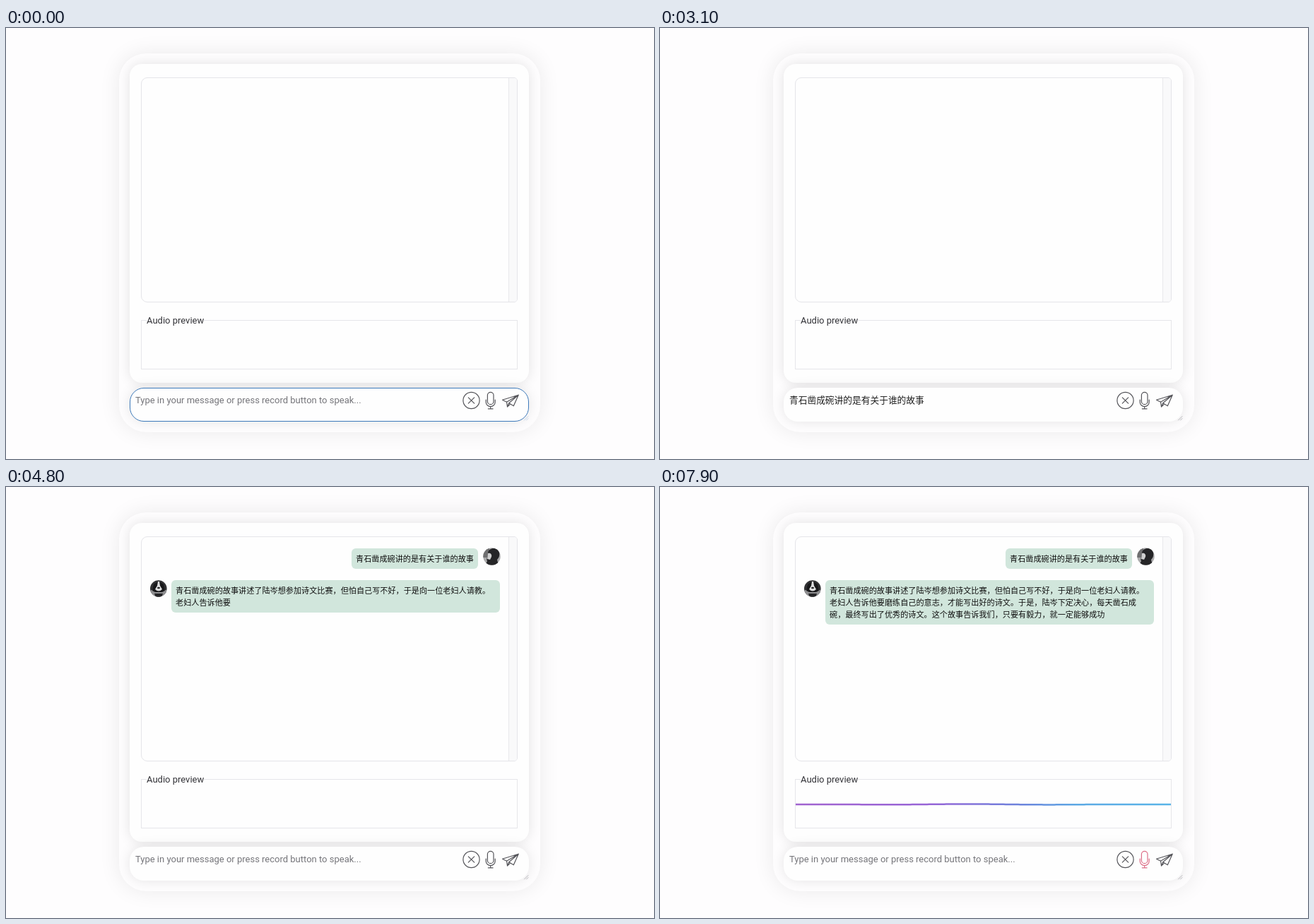
Recreate the animation shown at these times as an HTML page with a canvas. Size 917 by 611 pixels, loop 8000 ms.

```html
<!DOCTYPE html>
<html lang="zh-CN">
<head>
<meta charset="utf-8">
<title>Chat</title>
<style>
html, body { margin: 0; width: 100%; height: 100%; overflow: hidden; background: #fefdfe; }
body { position: relative; font: 13px/20px Roboto, "Noto Sans CJK SC", sans-serif; color: #333338; }
body > * { position: absolute; box-sizing: border-box; }
#outer { left: 160px; top: 36px; width: 596px; height: 537px; border-radius: 38px;
  background: #fefdfe; box-shadow: 0 0 30px rgba(0,0,0,.08); }
#card { left: 175px; top: 51px; width: 565px; height: 452px; border-radius: 17px;
  background: #fefefe; box-shadow: 0 0 18px rgba(0,0,0,.11); }
#log { left: 191px; top: 70px; width: 533px; height: 319px; border: 1.3px solid #e5e5e9;
  border-radius: 9px 5px 5px 9px; overflow: hidden; }
#log i { position: absolute; right: 0; top: 0; width: 12px; height: 100%;
  box-sizing: border-box; background: #f9f9fa; border-left: 1px solid #e8e8eb; }
#preview { left: 191px; top: 414px; width: 533px; height: 70px; border: 1px solid #e6e6ea; }
#legend { left: 199px; top: 404.5px; background: #fefefe; white-space: nowrap; }
#input { left: 175px; top: 509.5px; width: 565px; height: 48px; border-radius: 20px;
  background: #fefefe; box-shadow: 0 0 18px rgba(0,0,0,.1); }
#input.focus { border: 1.7px solid #3d7abb; }
#text { left: 183px; top: 517.5px; white-space: pre; font-size: 12.73px; color: #222; }
#text.hint { font-size: 13px; color: #75757a; }
#text u { text-decoration-thickness: 1px; text-underline-offset: 2px; }
#caret { display: inline-block; width: 1px; height: 16px; vertical-align: -3px; background: #333; }
.bubble { padding: 6px; border-radius: 6px; background: #d1e6dc; color: #111;
  font: 500 11.13px/17px "Noto Sans CJK SC", "Noto Sans CJK", sans-serif;
  width: max-content; max-width: 465px; text-spacing-trim: space-all; }
#ask { right: auto; left: 489px; top: 87px; }
#reply { left: 234px; top: 132px; }
svg, canvas { left: 0; top: 0; width: 917px; height: 611px; }
</style>
</head>
<body>
<div id="outer"></div>
<div id="card"></div>
<div id="log"><i></i></div>
<div id="preview"></div>
<div id="legend">Audio preview</div>
<div id="input"></div>
<div id="text"></div>
<div id="ask" class="bubble"></div>
<div id="reply" class="bubble"></div>
<canvas id="wave" width="917" height="611"></canvas>
<svg viewBox="0 0 917 611" fill="none" stroke="#55555a" stroke-width="1.2" stroke-linecap="round" stroke-linejoin="round">
  <clipPath id="clipA"><circle cx="687.5" cy="98.5" r="12.2"/></clipPath>
  <clipPath id="clipB"><circle cx="215.8" cy="144" r="11.8"/></clipPath>
  <g id="userPic" stroke="none" clip-path="url(#clipA)">
    <path fill="#a9a9aa" d="M675 86h25v25h-25z"/>
    <path fill="#6f6f70" d="M675 86h9v14h-9z"/>
    <path fill="#252527" d="M682 94c0-8 14-10 16-1 1 5-1 8-3 10l2 8h-19l3-6c-2-3 1-5 1-11z"/>
    <path fill="#d0d0d0" d="M682 94c3-1 6 1 5 5l-2 4-4-1z"/>
  </g>
  <g id="botPic" stroke="none" clip-path="url(#clipB)">
    <path fill="#313133" d="M203 132h26v25h-26z"/>
    <path fill="#8f8f91" d="M203 147l7-2 6 4 6-4 7 2v10h-26z"/>
    <path fill="#18181a" d="M209 138q7-7 14 0l2 9-4 2h-10l-4-2z"/>
    <path fill="#dededf" d="M215 134h2l1 6 3 5q-5 5-10 0l3-5z"/>
    <ellipse cx="216" cy="143" rx="2" ry="1.3" fill="#252527"/>
    <path fill="#252527" d="M210 151h12l-2 6h-8z"/>
  </g>
  <circle cx="658.5" cy="528" r="11.6"/>
  <path d="M654.3 523.8l8.4 8.4M662.7 523.8l-8.4 8.4"/>
  <g id="mic">
    <rect x="681.4" y="516.3" width="8.6" height="17.4" rx="4.3"/>
    <path d="M679.2 527v3.2a6.5 6.5 0 0 0 13 0V527M685.7 536.7v3M682.3 539.8h6.8"/>
  </g>
  <path d="M702.5 527.3L725.2 520.2 718.3 535.8 711.7 531.7 725.2 520.2 708.5 530.2zM708.5 530.2L709.5 537 711.7 531.7M709.5 537L713.6 533"/>
  <path id="grip" stroke="#a5a5aa" stroke-width=".8" d="M733.5 556l5.5-5.5M736.5 556l2.5-2.5"/>
</svg>
<script>
const LOOP = 8000, SEND = 3200, REPLY = 3400, RECORD = 6800;
const $ = id => document.getElementById(id);
const title = '青石凿成碗', question = title + '讲的是有关于谁的故事';
const answer = title + '的故事讲述了陆岑想参加诗文比赛，但怕自己写不好，于是向一位老妇人请教。' +
  '老妇人告诉他要磨练自己的意志，才能写出好的诗文。于是，陆岑下定决心，每天凿石成碗，' +
  '最终写出了优秀的诗文。这个故事告诉我们，只要有毅力，就一定能够成功';
const hint = 'Type in your message or press record button to speak...';

// One entry per 100 ms: committed length, then pinyin being composed
const typing = ['0', '0qi', '0qing', '0qing sh', '0qing shi za', '0qing shi zao ch',
  '0qing shi zao cheng', '0qing shi zao cheng wan', '5', '5ji', '5jiang', '5jiang de',
  '7sh', '8', '8you', '8you guan y', '11sh', '11shui', '11shui', '12', '12d', '13',
  '13g', '13gu', '13gu sh', '13gu shi', '15'];

// [time, characters shown]
const stream = [[REPLY, 1], [4100, 26], [4600, 44], [4700, 44], [5600, 79], [5700, 83], [6400, 114]];

function streamed(t) {
  const i = stream.findIndex(k => k[0] > t);
  if (i < 0) return answer.length;
  if (i === 0) return 0;
  const [t0, n0] = stream[i - 1], [t1, n1] = stream[i];
  return Math.floor(n0 + (n1 - n0) * (t - t0) / (t1 - t0));
}

function inputHtml(t) {
  const [, count, pinyin] = typing[Math.min(t / 100, typing.length - 1)].match(/^(\d+)(.*)$/);
  const caret = t < 2800 ? '<span id="caret"></span>' : '';
  return question.slice(0, count) + (pinyin && `<u>${pinyin}</u>`) + caret;
}

const ctx = $('wave').getContext('2d');
const tint = ctx.createLinearGradient(192, 0, 723, 0);
tint.addColorStop(0, '#a163cf');
tint.addColorStop(.35, '#9864d6');
tint.addColorStop(.6, '#6c83dc');
tint.addColorStop(.75, '#5ca9e4');
tint.addColorStop(1, '#58b4e8');

function drawWave(t) {
  ctx.clearRect(0, 0, 917, 611);
  if (t < RECORD) return;
  ctx.beginPath();
  for (let x = 192; x <= 723; x += 3) {
    const u = (x - 192) / 531, env = Math.sin(Math.PI * u) ** 2;
    const y = 450 + .55 * env * Math.sin(u * 13 - 1.2 + (7900 - t) / 260);
    ctx.lineTo(x, y);
  }
  ctx.strokeStyle = tint;
  ctx.lineWidth = 2.5;
  ctx.stroke();
}

const show = (id, on) => { $(id).style.visibility = on ? 'visible' : 'hidden'; };
let last = -1;

function render(t) {
  const sent = t >= SEND, empty = t < 100 || sent;
  $('text').className = empty ? 'hint' : '';
  $('text').innerHTML = empty ? hint : inputHtml(t);
  $('input').className = t < 3000 ? 'focus' : '';
  $('grip').setAttribute('stroke', t < 3000 ? '#b9cde6' : '#a5a5aa');
  show('ask', sent);
  show('userPic', sent);
  show('reply', t >= REPLY);
  show('botPic', t >= REPLY);
  $('reply').textContent = answer.slice(0, streamed(t));
  $('mic').setAttribute('stroke', t >= RECORD ? '#dd6f88' : '#55555a');
  drawWave(t);
}

function frame() {
  const t = Math.floor(performance.now() % LOOP / 100) * 100;
  if (t !== last) render(last = t);
  requestAnimationFrame(frame);
}

$('ask').textContent = question;
frame();
</script>
</body>
</html>
```
